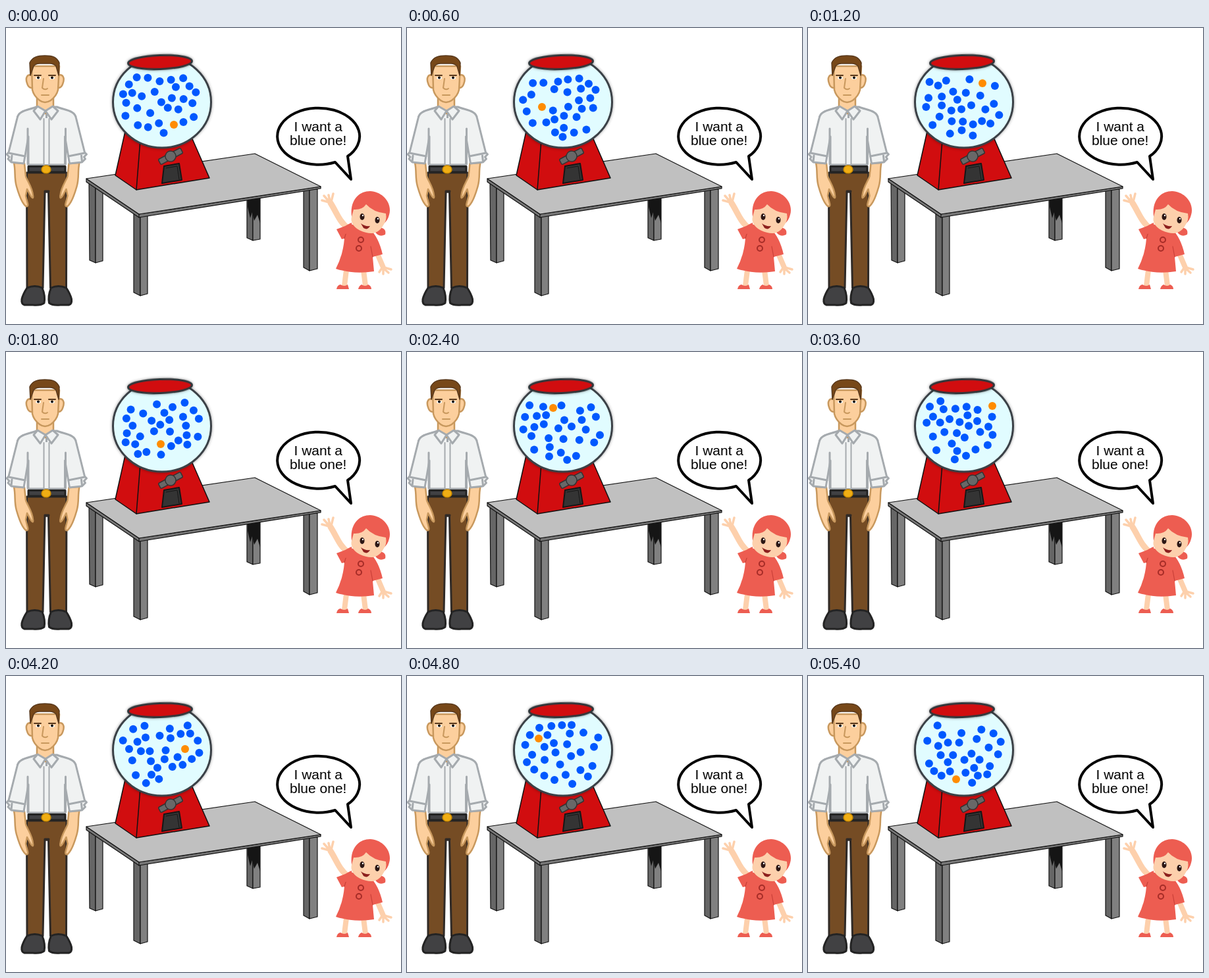
Recreate the animation shown at these times as an HTML page. Size 600 px wide and 450 px high, loop 6000 ms.

```html
<!DOCTYPE html>
<html lang="en">
<head>
<meta charset="utf-8">
<title>Gumball machine</title>
<style>
  html, body { margin: 0; width: 100%; height: 100%; overflow: hidden; background: #fff; }
  svg { display: block; width: 100vw; height: 100vh; }
  text { font: 21px "Liberation Sans", Arial, sans-serif; }
  path, ellipse, circle { stroke-linejoin: round; stroke-linecap: round; }
  .line { fill: none; }
  .metal { stroke: #111; stroke-width: 1.2; }
  .shirt { fill: #f0f2f2; stroke: #a5aaae; stroke-width: 3; }
  .skin { fill: #fccf9d; stroke: #c8985d; stroke-width: 2.5; }
  .dark { fill: #414143; stroke: #232323; stroke-width: 3; }
  .glow { filter: drop-shadow(0 0 2px #0006); }
</style>
</head>
<body>
<svg viewBox="0 0 600 450">
  <defs>
    <g id="manSide">
      <path fill="#754c24" stroke="#302a26" stroke-width="3" d="M31.500 220 L32 394 Q44 398 56 395 L59 249 H63 V220Z"/>
      <path class="dark" d="M32 395 Q44 390 55 395 Q60 407 58 418 Q53 422 41 421 H28 Q23 420 24 412 Q26 404 32 395Z"/>
      <path class="skin" d="M12 205 C15 219 12 227 16 241 C20 255 25 267 30 271 Q34 272 33 267 L30 255 L32 245 L38 256 Q42 261 41 255 C40 241 31 231 30 225 L28 206Z"/>
      <path class="shirt" d="M46 120 C34 125 19 125 17 137 L4 189 L1 192 L5 196 L3 199 L8 204 L27 206 L34 165 V208 H62 V120Z"/>
      <path class="shirt line" d="M4 190 L29 195 M9 194 L8 203 M33 153 V207"/>
    </g>
    <path id="ear" class="skin" d="M40 72 C32 69 29 76 32 84 C34 91 38 92 42 90"/>
  </defs>
  <rect width="600" height="450" fill="#fff"/>

  <g id="man">
    <use href="#manSide"/>
    <use href="#manSide" transform="matrix(-1 0 0 1 123.5 0)"/>
    <path fill="#754c24" d="M58 222 H66 V248 H58Z"/>
    <path class="line" stroke="#302a26" stroke-width="3" d="M59 248 H65"/>
    <path fill="#f0f2f2" d="M57 137 H66 V207 H57Z"/>
    <path class="shirt line" style="stroke-width: 2" d="M57.500 138 V207 M65.500 138 V207"/>
    <path class="dark" d="M34 210.500 H90 V219 H34Z"/>
    <ellipse cx="61" cy="215" rx="7" ry="6" fill="#f0ae14" stroke="#c78700" stroke-width="1.5"/>
    <path class="skin" d="M47 103 V121 L60 130 L72 121 V103Z"/>
    <path class="shirt" d="M48 119 L42 126 L52 139 L60 126Z M71 119 L79 126 L69 139 L60 126Z"/>
    <use href="#ear"/>
    <use href="#ear" transform="matrix(-1 0 0 1 118.500 0)"/>
    <path class="skin" d="M39 58 L40 94 Q42 103 51 110 Q59 116 68 110 Q77 103 79 94 L81 58Z"/>
    <path fill="#774819" stroke="#59391c" stroke-width="1.5" d="M37 72 L36 53 C40 44 48 42 59 42 C71 42 77 44 81 53 L80 72 L76 58 Q72 54 67 54 H51 Q45 54 42 58Z"/>
    <path class="line" stroke="#59391c" stroke-width="2" d="M43 72 L53 72 M65 72 L75 72"/>
    <ellipse cx="49" cy="76" rx="3.800" ry="2" fill="#fff"/>
    <ellipse cx="70" cy="76" rx="3.800" ry="2" fill="#fff"/>
    <circle cx="49" cy="75.500" r="2"/>
    <circle cx="70" cy="75.500" r="2"/>
    <path class="line" stroke="#c8985d" stroke-width="2" d="M57 77 L55 91 Q59 95 63 92 M54 102 H65"/>
  </g>

  <g id="table" class="metal">
    <path fill="#666" d="M126 230 L136 238 V357 L127 353Z M366 255 H375 V323 L366 319Z M194 276 L204 285 V407 L194 402Z M452 245 H461 V369 L452 364Z"/>
    <path fill="#808080" d="M136 238 H147 V354 L136 357Z M375 255 H386 V321 L375 323Z M204 285 L215 282 V404 L204 407Z M461 245 H473 V366 L461 369Z"/>
    <path fill="#151515" stroke="none" d="M367 258 H386 V297 L382 284 L377 293 L374 280 L371 289 L367 272Z"/>
    <path fill="#777" d="M122 229 L202 283 L478 241 V244 L202 288 L122 234Z"/>
    <path fill="#c0c0c0" d="M122 229 L378 191 L478 241 L202 283Z"/>
    <path class="line" d="M202 283 V288"/>
  </g>

  <g id="machine">
    <path fill="#d10d0f" stroke="#111" stroke-width="1.5" d="M181 157 L166 224 L198 246 L309 228 L278 157Z"/>
    <path class="line" stroke="#111" stroke-width="1.5" d="M204 170 L198 246"/>
    <path fill="#343434" stroke="#161616" stroke-width="2" d="M240 210 L263 206 L267 231 L237 236Z"/>
    <path class="line" stroke="#161616" d="M243 213 L260 210 L263 230"/>
    <g transform="translate(250 195) rotate(-28)" fill="#686868" stroke="#333" stroke-width="1.5">
      <rect x="-19" y="-4.500" width="38" height="9" rx="2"/>
      <circle r="8"/>
    </g>
    <ellipse class="glow" cx="237" cy="112.500" rx="74.500" ry="69.500" fill="#e1fcff" stroke="#3b4147" stroke-width="3"/>
    <g id="balls"></g>
    <ellipse class="glow" cx="234" cy="52" rx="48.500" ry="10.500" transform="rotate(-2 234 52)" fill="#d10d0f" stroke="#30363a" stroke-width="3"/>
  </g>

  <g id="speech">
    <path fill="#fff" stroke="#000" stroke-width="4" d="M500 204 A62.500 43 0 1 1 519 195 L524 230Z"/>
    <text x="437.500" y="156.500">I want a</text>
    <text x="431" y="177.500">blue one!</text>
  </g>

  <g id="girl">
    <g fill="none" stroke="#fdd0ac">
      <path stroke-width="9" d="M519 304 C506 294 502 280 493 266"/>
      <path stroke-width="3.500" d="M491 265 L480 262 M490 263 L483 255 M492 263 L490 254 M494 264 L497 252"/>
      <path stroke-width="8" d="M564 343 L573 364"/>
      <path stroke-width="3.500" d="M574 364 L585 367 M574 366 L581 372 M573 366 L573 374 M571 365 L567 371"/>
      <path stroke-width="8" stroke-linecap="butt" d="M517 368 L514 392 M543 368 L546 392"/>
    </g>
    <path fill="#ed5d51" d="M502 397 Q503 391 508 390 Q514 394 519 390 L521 397Z M535 397 Q536 392 540 390 Q546 394 550 390 Q555 392 555 397Z"/>
    <path fill="#ed5d51" d="M523 298 L502 306 L510 321 L514 320 Q512 345 501 366 Q528 375 559 370 L557 348 L572 344 Q566 318 553 306Z"/>
    <path class="line" stroke="#c94038" stroke-width="1.2" d="M514 320 L517 310 M557 348 L554 332"/>
    <path fill="#ed5d51" d="M525 296 C517 299 510 304 509 312 Q518 316 526 307Z M564 304 C574 302 578 308 576 314 Q566 319 560 309Z"/>
    <path fill="#ed5d51" d="M526 292 C520 265 534 248 553 248 C574 249 587 268 582 284 Q580 293 573 298Z"/>
    <path fill="#fdd0ac" d="M528 276 Q541 277 547 268 Q558 280 577 282 Q579 292 573 300 C567 311 557 314 547 311 C533 308 522 298 525 287Z"/>
    <g fill="#2c1715">
      <ellipse cx="541" cy="287" rx="3.500" ry="5"/>
      <ellipse cx="564" cy="292" rx="3.500" ry="5"/>
    </g>
    <circle cx="542" cy="285" r="1.200" fill="#fff"/>
    <circle cx="565" cy="290" r="1.200" fill="#fff"/>
    <path fill="#8d201e" d="M539 297 Q545 302 553 301 Q549 308 543 304Z"/>
    <g fill="#ed5d51" stroke="#a62c27" stroke-width="2">
      <circle cx="539" cy="322" r="4"/>
      <circle cx="536" cy="335" r="4"/>
    </g>
  </g>
</svg>
<script>
  const STEP = 600, BLUE_COUNT = 29, SPACING = 13;
  // The orange ball's place at each shake of the globe
  const orangeStops = [
    [255, 147], [205, 120], [265, 84], [235, 140], [222, 85],
    [263, 124], [280, 82], [272, 111], [200, 95], [225, 157]
  ];

  function seededRandom(seed) {
    return () => (seed = seed * 16807 % 2147483647) / 2147483647;
  }

  // Scatter blue balls over the globe without overlaps
  function scatter(orange, index) {
    const random = seededRandom(7919 * (index + 1));
    const placed = [orange];
    while (placed.length <= BLUE_COUNT) {
      const x = 174 + random() * 120, y = 74 + random() * 92;
      const inside = Math.hypot((x - 234) / 61, (y - 113) / 54) < 1;
      if (inside && placed.every(([px, py]) => Math.hypot(px - x, py - y) > SPACING)) placed.push([x, y]);
    }
    return placed;
  }

  const layouts = orangeStops.map(scatter);
  const group = document.getElementById("balls");
  const balls = layouts[0].map((_, i) => {
    const ball = document.createElementNS(group.namespaceURI, "circle");
    ball.setAttribute("r", 6);
    ball.setAttribute("fill", i ? "#0058ff" : "#ff8c00");
    return group.appendChild(ball);
  });

  function draw() {
    const layout = layouts[Math.floor(performance.now() / STEP) % layouts.length];
    balls.forEach((ball, i) => {
      ball.setAttribute("cx", layout[i][0]);
      ball.setAttribute("cy", layout[i][1]);
    });
    requestAnimationFrame(draw);
  }
  draw();
</script>
</body>
</html>
```
